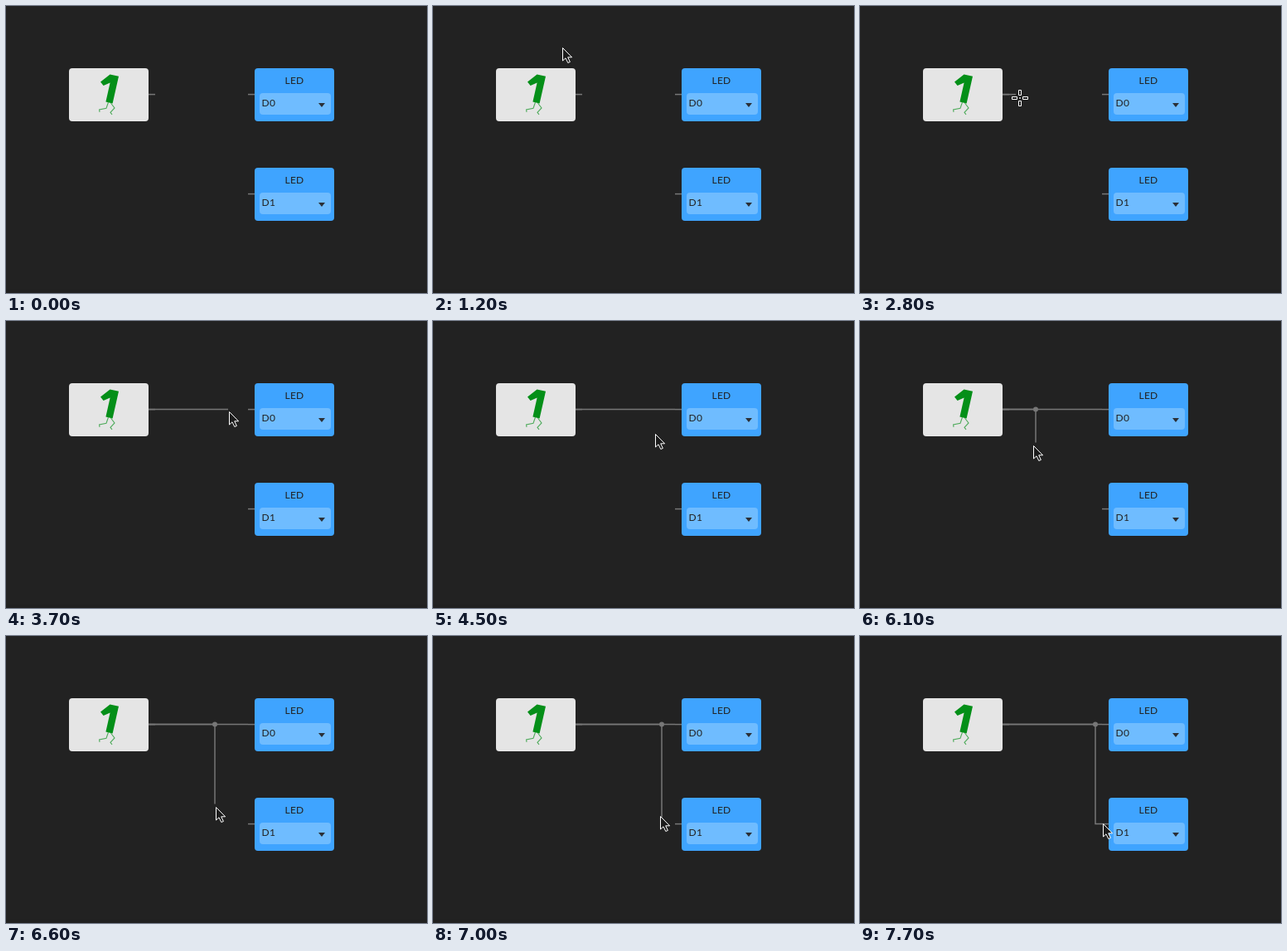
Recreate the animation shown at these times as an HTML page. Size 508 by 346 pixels, loop 8 s.

```html
<!DOCTYPE html>
<html lang="en">
<head>
<meta charset="utf-8">
<title>Wiring two LEDs</title>
<style>
  html, body { margin: 0; width: 100%; height: 100%; overflow: hidden; background: #222; }
  svg { display: block; width: 508px; height: 346px; }
  text { font: 12px Lato, "Open Sans", sans-serif; letter-spacing: .2px; fill: #222; }
  .wire { fill: none; stroke: #777; stroke-width: 1.5; }
  .pointer { fill: #1b1b1b; stroke: #fff; stroke-width: 1; }
</style>
</head>
<body>
<svg viewBox="0 0 508 346">
  <defs>
    <g id="led">
      <path class="wire" d="M-8 31.6H0"/>
      <rect width="96" height="64" rx="4" fill="#3fa4ff"/>
      <rect x="6" y="30" width="86" height="26" rx="4" fill="#6fbcff"/>
      <path d="M77 42h8l-4 5z" fill="#2b2f36"/>
      <text x="48" y="19" text-anchor="middle">LED</text>
    </g>
  </defs>
  <rect width="508" height="346" fill="#222"/>
  <rect y="342" width="508" height="4" fill="#202020"/>

  <path class="wire" d="M172 106.6h8"/>
  <rect x="76" y="75" width="96" height="64" rx="4" fill="#e5e5e5"/>
  <path d="M114 91.6 125.5 82.6 136 84.8 128.6 117.4 120.4 115.4 125.6 92.6 117.6 96z" fill="#048f18"/>
  <path d="M123.5 116 121 123.2 112.6 125 113 127.8M126.5 117 131 123 126 128.3 128 130.8"
        fill="none" stroke="#4fab5c" stroke-width="1.1"/>

  <use href="#led" x="300" y="75"/>
  <text x="308.6" y="121">D0</text>
  <use href="#led" x="300" y="195"/>
  <text x="308.6" y="241">D1</text>

  <path class="wire" id="first"/>
  <path class="wire" id="second"/>
  <circle id="joint" cy="106.4" r="3" fill="#777"/>

  <path class="pointer" id="arrow" d="M.5 .5V16L4 12.8 6.8 18.5 9.4 17.4 6.7 11.8H11.6z"/>
  <g class="pointer" id="cross">
    <path id="bars" d="M-1.5-9.5h3v6h-3zM-1.5 3.5h3v6h-3z"/>
    <use href="#bars" transform="rotate(90)"/>
    <circle r=".5"/>
  </g>
</svg>
<script>
const LOOP = 8000, STEP = 100;
const LEFT = 172, ROW = 106, BEND = 284, PORT = 292, GRID = 8;
const JOIN = 4100, BRANCH = 5900;

// Each move starts where the one before it ended.
// rush > 1 lets x run ahead of y; sag bows the path downwards.
const moves = [
  { from: 100, to: 400, x: 89, y: 14 },
  { from: 900, to: 1700, x: 184, y: 111, rush: 2.6 },
  { from: 2700, to: 3700, x: 269, y: 109 },
  { from: 3700, to: JOIN, x: 288, y: 110 },
  { from: 4300, to: 5300, x: 189, y: 122, sag: 41 },
  { from: 5300, to: 5500, x: 183, y: 117 },
  { from: 5800, to: 6600, x: 253, y: 206 },
  { from: 6600, to: 7200, x: 285, y: 223 },
  { from: 7300, to: 7700, x: 293, y: 226 }
];

const el = id => document.getElementById(id);
const show = (node, on) => node.setAttribute("visibility", on ? "visible" : "hidden");
const within = (t, from, to) => t >= from && t < to;
const snap = (v, origin) => origin + Math.floor((v + 3 - origin) / GRID) * GRID;

function pointerAt(t) {
  let x = 92, y = -8;
  for (const { from, to, x: endX, y: endY, rush = 1, sag = 0 } of moves) {
    if (t <= from) break;
    const u = Math.min(1, (t - from) / (to - from));
    x += (endX - x) * (1 - (1 - u) ** rush);
    y += (endY - y) * u + sag * Math.sin(Math.PI * u);
  }
  return [x, y];
}

function wireTo([px, py]) {
  const x = px > 286 ? PORT : snap(px, LEFT);
  const y = Math.max(ROW, snap(py, ROW));
  const bend = Math.min(x, BEND);
  const d = `M${LEFT} ${ROW + .6}H${bend}V${y + .6}H${x}`;
  return { d, bend, y };
}

function draw(t) {
  const pos = pointerAt(t);
  const crossOn = within(t, 1600, 3000) || within(t, 5500, 6000);
  for (const [id, on] of [["arrow", t >= 200 && !crossOn], ["cross", crossOn]]) {
    el(id).setAttribute("transform", `translate(${pos.map(Math.round).join(" ")})`);
    show(el(id), on);
  }

  el("first").setAttribute("d", wireTo(pointerAt(Math.min(t, JOIN))).d);
  show(el("first"), t >= 2800);

  const second = wireTo(pos);
  el("second").setAttribute("d", second.d);
  show(el("second"), t >= BRANCH);
  el("joint").setAttribute("cx", second.bend);
  show(el("joint"), t >= BRANCH && second.y > ROW);
}

const start = performance.now();
function tick() {
  const t = (performance.now() - start) % LOOP;
  draw(Math.floor(t / STEP) * STEP);
  requestAnimationFrame(tick);
}
tick();
</script>
</body>
</html>
```
